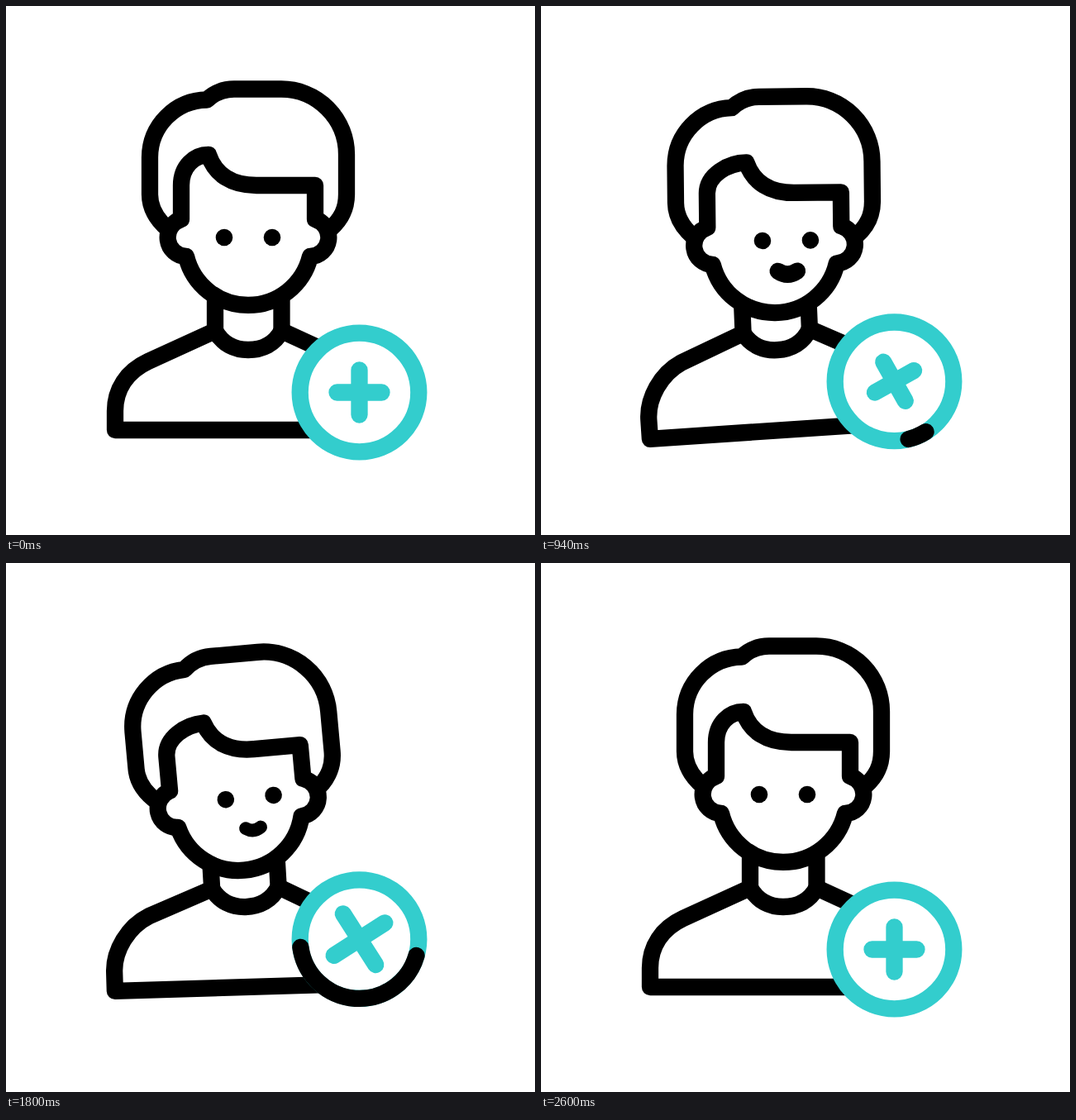
These frames come from a looping animation (640 by 640 pixels, 3000 ms). An HTML page:

```html
<!DOCTYPE html>
<html lang="en">
<head>
<meta charset="utf-8">
<title>Add user</title>
<style>
  html, body { margin: 0; width: 100%; height: 100%; overflow: hidden; background: #fff; }
  svg { display: block; width: 100%; height: 100%; }
  .line { fill: none; stroke: #000; stroke-width: 20.3; stroke-linecap: round; stroke-linejoin: round; }
  .teal { stroke: #33cdcd; }
</style>
</head>
<body>
<svg viewBox="0 0 640 640">
  <g id="body" class="line">
    <path id="neck"/>
    <path id="torso"/>
    <path d="M253 393 C262 409 277 416 293 416 C310 416 325 409 333.5 393"/>
    <g id="head">
      <path d="M196 270 C182 258 174 245 174 228 V183 A70 70 0 0 1 243 113.5 C252 105 263 100.5 276 100.5 H333 A79 79 0 0 1 412 180 V228 C412 245 406 258 392 270"/>
      <path id="outline"/>
      <g id="face">
        <g fill="#000" stroke="none">
          <circle cx="264" cy="280" r="10.3"/>
          <circle cx="322" cy="280" r="10.3"/>
        </g>
        <path id="mouth" d="M-11.7 0 Q0 8 11.7 0"/>
      </g>
    </g>
  </g>
  <g id="badge" class="line">
    <circle class="teal" r="71.8" style="fill:#fff"/>
    <path id="arc"/>
    <path id="plus" class="teal"/>
  </g>
</svg>
<script>
const LOOP = 3000;
const rad = Math.PI / 180;
const $ = id => document.getElementById(id);
const set = (id, name, value) => $(id).setAttribute(name, value);

// Smooth rise from 0 to 1 between two times; a bias below 1 front-loads it.
function ramp(t, from, to, bias = 1) {
  const x = Math.min(1, Math.max(0, (t - from) / (to - from))) ** bias;
  return x * x * (3 - 2 * x);
}

// Neck side: from a collar end up to its place under the chin.
function neckSide(x, tilt, drop) {
  const dx = x - 293, c = Math.cos(tilt * rad), s = Math.sin(tilt * rad);
  return `M${x} 393 L${293 + dx * c + 13 * s} ${368 + drop + dx * s - 13 * c}`;
}

// The shoulders slide and tip as the person turns.
function torso(look) {
  const x = 4 * look, y = 6.5 * look;
  return `M253 393 L${172 + x} ${430 - y} C${146 + x} ${442 - y} 132 464 132 490 V513
    H454 V490 C454 464 ${440 + x} ${442 + y} ${414 + x} ${430 + y} L333.5 393`;
}

// Fringe, ears and jaw; the fringe follows the gaze.
function outline(shift) {
  return `M212 258 V217 C212 194 ${228 + shift * 0.7} 180 ${245 + shift} 180
    C${253 + shift} 204 ${273 + shift} 217 ${303 + shift} 217 H374 V258
    A23 23 0 0 1 368 303 A77.2 77.2 0 0 1 218 303 A23 23 0 0 1 212 258 Z`;
}

function onRing(angle) {
  return `${71.8 * Math.sin(angle * rad)} ${-71.8 * Math.cos(angle * rad)}`;
}

function draw(t) {
  const r = (from, to, bias) => ramp(t, from, to, bias);

  const lean = -5.85 * r(560, 1190) + 10.15 * r(1600, 2060) - 4.3 * r(2060, 2600);
  const tilt = 5 * r(205, 640) - 16 * r(774, 1584) + 16 * r(1570, 2050) - 5 * r(2050, 2600);
  const drop = 10.6 * (r(205, 1200) - r(1630, 2600));
  const look = r(205, 660) - r(2160, 2600);
  const smile = r(600, 800) - r(1740, 1940);

  set('body', 'transform', `rotate(${lean} 293 520)`);
  set('torso', 'd', torso(look));
  set('neck', 'd', neckSide(253, tilt, drop) + neckSide(333.5, tilt, drop));
  set('head', 'transform', `translate(0 ${drop}) rotate(${tilt} 293 368)`);
  set('outline', 'd', outline(15 * look));
  set('face', 'transform', `translate(${14.5 * look} ${-5.3 * look})`);
  set('mouth', 'transform', `translate(294 317) scale(${smile})`);
  set('mouth', 'visibility', smile > 0.01 ? 'visible' : 'hidden');

  const bob = 39.5 * (r(205, 590) - r(2055, 2500)) - 109 * (r(590, 1525, 0.73) - r(1530, 2055));
  const spin = -218 * r(250, 2050, 0.66) - 52 * r(2040, 2600);
  const arm = 27 + 9.6 * (r(1080, 1720) - r(2000, 2600));
  const tail = 148 + 540 * r(1040, 2400);
  const tip = 148 + 540 * r(800, 2080);

  set('badge', 'transform', `translate(427.5 ${467.5 + bob})`);
  set('plus', 'd', `M${-arm} 0 H${arm} M0 ${-arm} V${arm}`);
  set('plus', 'transform', `rotate(${spin})`);
  set('arc', 'd', tip - tail > 0.5
    ? `M${onRing(tail)} A71.8 71.8 0 ${tip - tail > 180 ? 1 : 0} 1 ${onRing(tip)}` : '');
}

const start = performance.now();
function tick() {
  draw((performance.now() - start) % LOOP);
  requestAnimationFrame(tick);
}
tick();
</script>
</body>
</html>
```
